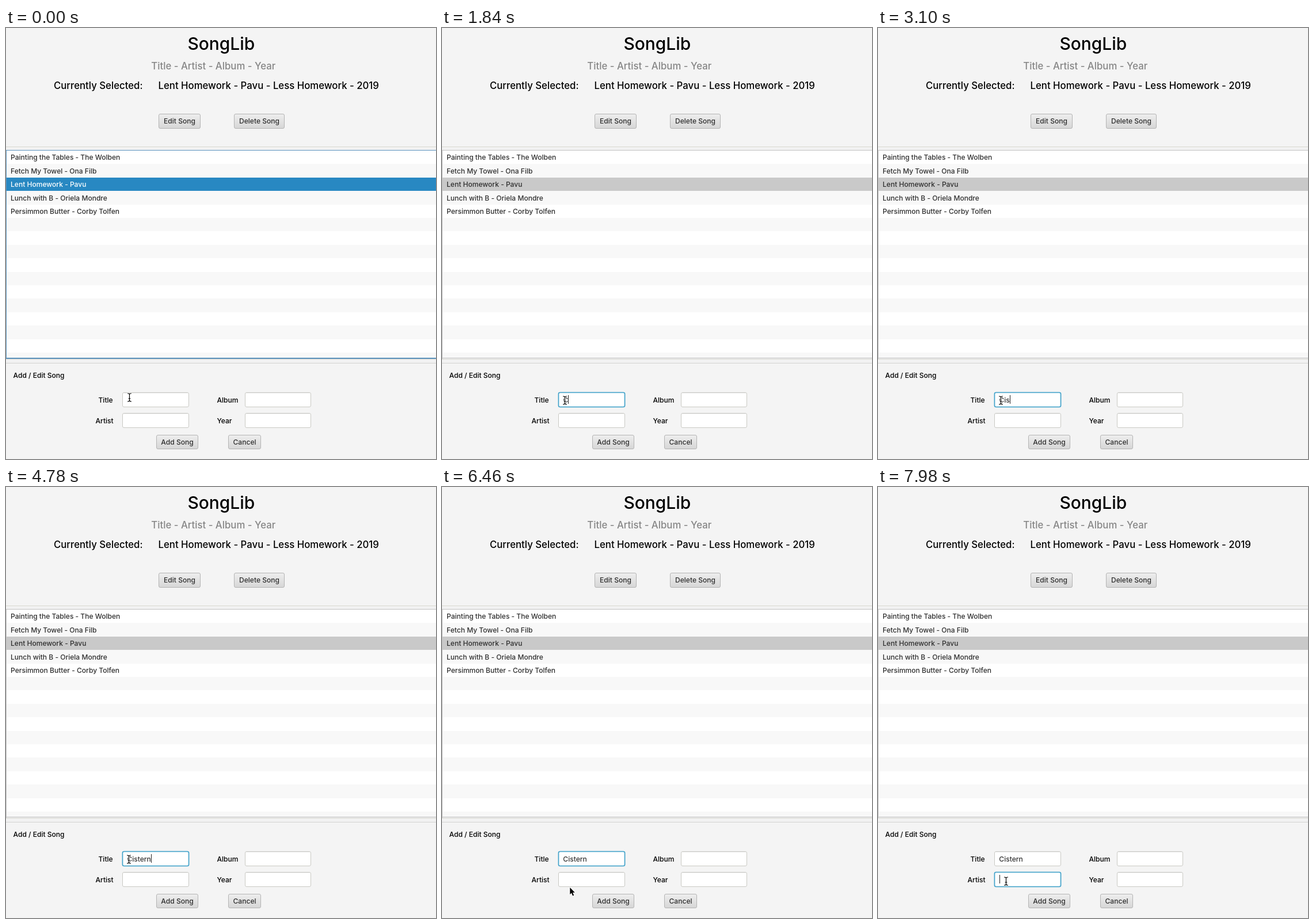
An HTML page with a canvas for the animation above (8000 ms loop, 747 by 749 pixels).

```html
<!DOCTYPE html>
<html lang="en">
<head>
<meta charset="utf-8">
<title>SongLib</title>
<style>
  html, body { margin: 0; width: 100%; height: 100%; overflow: hidden; background: #f4f4f4; }
  canvas { display: block; width: 747px; height: 749px; }
</style>
</head>
<body>
<canvas id="stage" width="747" height="749"></canvas>
<script>
const ctx = document.getElementById('stage').getContext('2d');
const W = 747, H = 749, LOOP = 8000;
const SMALL = 12.05, LARGE = 16.75;
const ROW = 23.4, LIST_TOP = 213, LIST_BOTTOM = 574;
const SELECTED = 2;

const songs = [
  'Painting the Tables - The Wolben',
  'Fetch My Towel - Ona Filb',
  'Lent Homework - Pavu',
  'Lunch with B - Oriela Mondre',
  'Persimmon Butter - Corby Tolfen'
];
const typed = 'Cistern';
const keyTimes = [1700, 2300, 2800, 3300, 3700, 4100, 4500];
const TITLE_FOCUS = 780, ARTIST_FOCUS = 7600;

// Pointer path: time, x, y
const path = [
  [0, 214, 642], [120, 214, 642], [560, 213, 647], [5350, 213, 647],
  [5920, 221, 703], [6200, 222, 703], [6460, 222, 696], [6720, 222, 685], [8000, 222, 685]
];

const fields = {
  title: [202.5, 633.5, 115, 25],
  artist: [202.5, 669.5, 115, 25],
  album: [415.5, 633.5, 114, 25],
  year: [415.5, 669.5, 114, 25]
};

function rect(x, y, w, h, color) {
  ctx.fillStyle = color;
  ctx.fillRect(x, y, w, h);
}

function roundBox(x, y, w, h, r, fill, stroke, width = 1) {
  ctx.beginPath();
  ctx.roundRect(x, y, w, h, r);
  if (fill) { ctx.fillStyle = fill; ctx.fill(); }
  if (stroke) { ctx.strokeStyle = stroke; ctx.lineWidth = width; ctx.stroke(); }
}

function text(str, x, y, size = SMALL, color = '#000', align = 'left') {
  ctx.font = `500 ${size}px Inter, "Noto Sans", sans-serif`;
  ctx.textAlign = align;
  ctx.fillStyle = color;
  ctx.fillText(str, x, y);
}

function button(label, x, y, w, h) {
  const g = ctx.createLinearGradient(0, y, 0, y + h);
  g.addColorStop(0, '#eeeeee');
  g.addColorStop(1, '#d6d6d6');
  roundBox(x, y, w, h, 2.5, g, '#b4b4b4');
  text(label, x + w / 2, y + 16.9, SMALL, '#2e2e2e', 'center');
}

function field(box, focused) {
  const [x, y, w, h] = box;
  if (focused) {
    roundBox(x - 0.8, y - 0.8, w + 1.6, h + 1.6, 3, null, '#d3e6ee');
    roundBox(x, y, w, h, 2.5, '#fff', '#42a2c9', 1.6);
  } else {
    roundBox(x, y, w, h, 2.5, '#fff', '#c9c9c4');
    rect(x + 2, y + 0.5, w - 4, 1, '#ededed');
  }
}

function caret(x, y, since) {
  if (since % 1000 < 500) rect(x, Math.floor(y) + 5, 1, 15, '#222');
}

function drawHeader() {
  text('SongLib', 315.5, 38, 29.9);
  text('Title - Artist - Album - Year', 252.3, 72, LARGE, '#868686');
  text('Currently Selected:', 83, 106, LARGE);
  text('Lent Homework - Pavu - Less Homework - 2019', 264.5, 106, LARGE);
  button('Edit Song', 265.5, 149.5, 72, 25);
  button('Delete Song', 396.5, 149.5, 87, 25);
}

function drawList(focused) {
  rect(0, 206, W, 1, '#d8d8d0');
  rect(0, 207, W, 5, '#f2f2f2');
  rect(0, LIST_TOP, W, LIST_BOTTOM - LIST_TOP, '#fff');
  ctx.save();
  ctx.beginPath();
  ctx.rect(0, LIST_TOP, W, LIST_BOTTOM - LIST_TOP);
  ctx.clip();
  for (let i = 0; i < 16; i++) {
    const y = Math.round(LIST_TOP + i * ROW);
    const h = Math.round(LIST_TOP + (i + 1) * ROW) - y;
    const on = i === SELECTED;
    if (on) rect(0, y, W, h, focused ? '#2888c2' : '#c9c9c9');
    else if (i % 2) rect(0, y, W, h, '#f8f8f8');
    if (songs[i]) text(songs[i], 8, LIST_TOP + i * ROW + 16.4, SMALL, on && focused ? '#fff' : '#2e2e2e');
  }
  ctx.restore();
  const edge = focused ? '#5b93bd' : '#c2c2c2';
  rect(0, LIST_TOP - 1, W, 1, edge);
  rect(0, LIST_TOP - 1, 1, LIST_BOTTOM - LIST_TOP + 2, edge);
  rect(0, LIST_BOTTOM - 1, W, focused ? 2 : 1, edge);
  rect(0, 575, W, 1, '#d6d6d0');
  rect(0, 576, W, 6, '#f2f2f2');
  rect(0, 582, W, 1, '#d2d2d0');
}

function drawForm(t) {
  const inTitle = t >= TITLE_FOCUS && t < ARTIST_FOCUS;
  const inArtist = t >= ARTIST_FOCUS;
  text('Add / Edit Song', 12.5, 608);
  text('Title', 160.5, 650.5);
  text('Artist', 155.5, 686.5);
  text('Album', 366.5, 650.5);
  text('Year', 366.5, 686.5);
  field(fields.title, inTitle);
  field(fields.artist, inArtist);
  field(fields.album);
  field(fields.year);
  button('Add Song', 261.5, 707.5, 72, 24);
  button('Cancel', 386.5, 707.5, 56, 24);

  const count = keyTimes.filter(k => k <= t).length;
  const value = typed.slice(0, count);
  text(value, 210.3, 650.5, SMALL, '#333');
  if (inTitle) {
    const x = 210.3 + ctx.measureText(value).width;
    caret(Math.round(x), fields.title[1], t - (count ? keyTimes[count - 1] : TITLE_FOCUS));
  }
  if (inArtist) caret(211, fields.artist[1], t - ARTIST_FOCUS);
}

function pointerAt(t) {
  let i = 1;
  while (i < path.length - 1 && path[i][0] < t) i++;
  const [t0, x0, y0] = path[i - 1], [t1, x1, y1] = path[i];
  const p = Math.min(1, Math.max(0, (t - t0) / (t1 - t0)));
  const e = p * p * (3 - 2 * p);
  return [Math.round(x0 + (x1 - x0) * e), Math.round(y0 + (y1 - y0) * e)];
}

function drawBeam(x, y) {
  const shape = new Path2D('M-3 -7 Q0 -7 0 -5 Q0 -7 3 -7 M0 -5 V5 M-3 7 Q0 7 0 5 Q0 7 3 7 M-1.5 2 H1.5');
  ctx.save();
  ctx.translate(x + 0.5, y);
  ctx.lineCap = 'round';
  for (const [color, width] of [['#fff', 3], ['#000', 1.2]]) {
    ctx.strokeStyle = color;
    ctx.lineWidth = width;
    ctx.stroke(shape);
  }
  ctx.restore();
}

function drawArrow(x, y) {
  const shape = new Path2D('M0 0 V12 L2.7 9.6 L4.8 14.4 L6.8 13.5 L4.8 8.8 H8.5 Z');
  ctx.save();
  ctx.translate(x + 0.3, y);
  ctx.lineJoin = 'round';
  ctx.strokeStyle = '#fff';
  ctx.lineWidth = 2;
  ctx.stroke(shape);
  ctx.fillStyle = '#000';
  ctx.fill(shape);
  ctx.restore();
}

function drawPointer(t) {
  const [x, y] = pointerAt(t);
  const inside = Object.values(fields).some(([fx, fy, w, h]) =>
    x >= fx && x <= fx + w && y >= fy && y <= fy + h);
  (inside ? drawBeam : drawArrow)(x, y);
}

function draw(t) {
  rect(0, 0, W, H, '#f4f4f4');
  drawHeader();
  drawList(t < TITLE_FOCUS);
  drawForm(t);
  drawPointer(t);
}

const start = performance.now();
function tick() {
  draw((performance.now() - start) % LOOP);
  requestAnimationFrame(tick);
}
tick();
</script>
</body>
</html>
```
